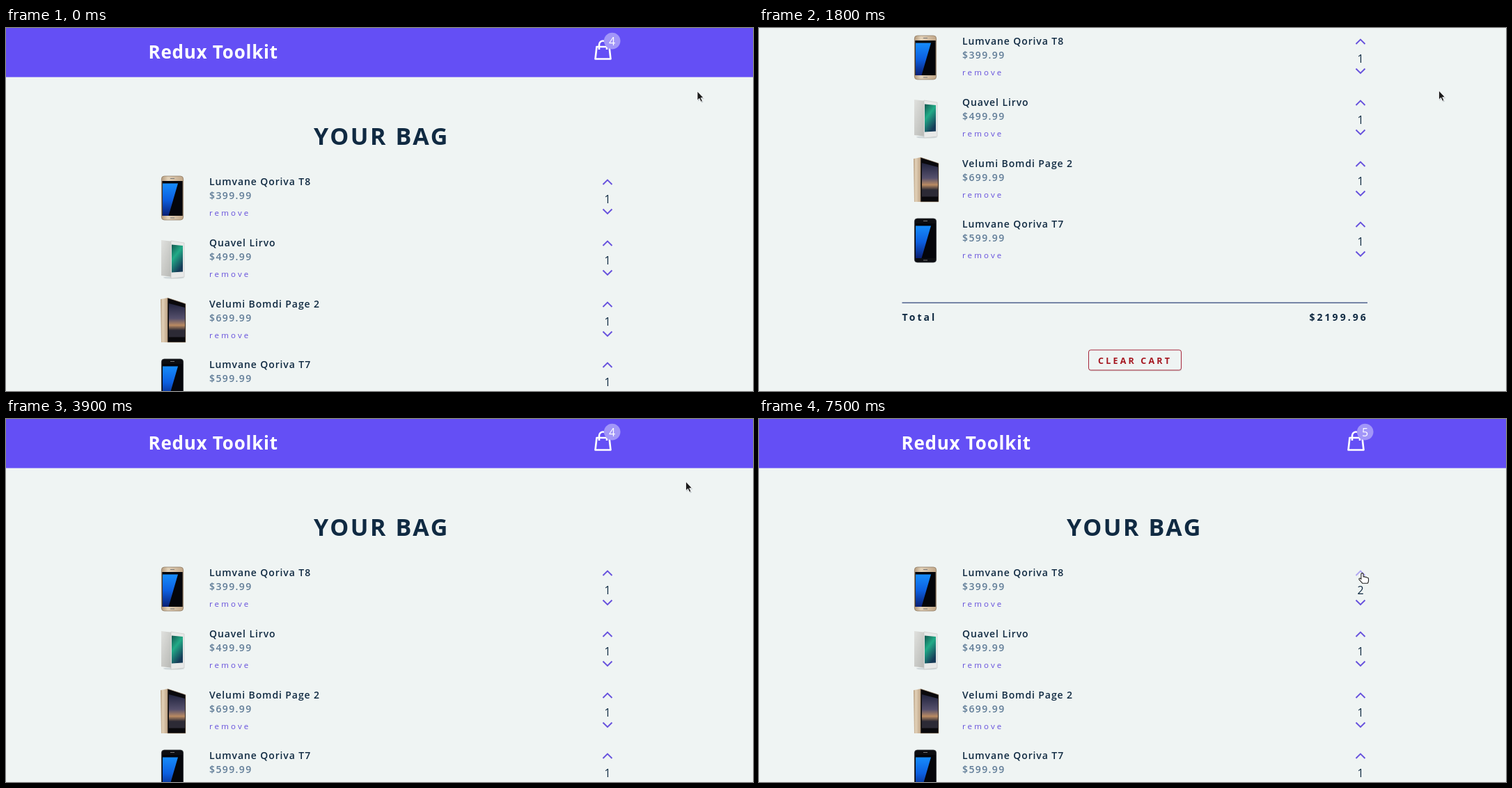
These frames come from a looping animation (1073x522 px, 8000 ms). An HTML page:

```html
<!DOCTYPE html>
<html lang="en">
<head>
<meta charset="utf-8">
<title>Your bag</title>
<style>
  html, body { margin: 0; width: 100%; height: 100%; overflow: hidden; background: #eff4f3; }
  svg { display: block; font-family: "Open Sans", "Noto Sans", sans-serif; fill: #102a42; }
  text { white-space: pre; }
  .brand { font-size: 26px; font-weight: 700; letter-spacing: .75px; fill: #fff; }
  .heading { font-size: 34px; font-weight: 700; letter-spacing: 2.6px; }
  .name { font-size: 14px; font-weight: 600; letter-spacing: .9px; }
  .price { font-size: 14px; font-weight: 600; letter-spacing: 1.4px; fill: #617d98; }
  .remove { font-size: 11.5px; letter-spacing: 3.15px; fill: #6550dc; }
  .qty { font-size: 16px; text-anchor: middle; }
  .badge { fill: #fff; }
  .total { font-size: 14px; font-weight: 700; letter-spacing: 3.05px; }
  .clear { font-size: 12.5px; font-weight: 700; letter-spacing: 3.2px; fill: #a5161f; }
  .chevron { fill: none; stroke: #6650dd; stroke-width: 1.9; }
  .hover { stroke: #b0a6f3; }
</style>
</head>
<body>
<svg width="1073" height="522" viewBox="0 0 1073 522">
  <defs>
    <linearGradient id="blue" x2="0" y2="1">
      <stop stop-color="#168cfb"/><stop offset=".5" stop-color="#0c5fe0"/><stop offset="1" stop-color="#0a1f74"/>
    </linearGradient>
    <linearGradient id="gold">
      <stop stop-color="#b39a7c"/><stop offset=".3" stop-color="#e3d2b9"/><stop offset="1" stop-color="#c0a688"/>
    </linearGradient>
    <linearGradient id="silver" y2="1">
      <stop stop-color="#e0e1de"/><stop offset="1" stop-color="#b4b5b1"/>
    </linearGradient>
    <linearGradient id="teal" x2=".5" y2="1">
      <stop stop-color="#12574f"/><stop offset=".45" stop-color="#22ab87"/><stop offset="1" stop-color="#173b58"/>
    </linearGradient>
    <linearGradient id="dusk" x2="0" y2="1">
      <stop stop-color="#20233d"/><stop offset=".45" stop-color="#56506c"/><stop offset=".65" stop-color="#b98a62"/><stop offset=".8" stop-color="#2c2a35"/>
    </linearGradient>
  </defs>
  <g id="page">
    <rect width="1073" height="70.6" fill="#644ff5"/>
    <text class="brand" x="204.5" y="44">Redux Toolkit</text>
    <path d="M848.5 27H866.5L868.5 44.5H846.5ZM852 31V24a5.5 5.5 0 0 1 11 0V31" fill="none" stroke="#fff" stroke-width="2.6" stroke-linejoin="round"/>
    <circle cx="870.7" cy="18.6" r="11.8" fill="#a296f8"/>
    <text class="qty badge" id="badge" x="870.7" y="24.6"></text>
    <text class="heading" x="442" y="167.7">YOUR BAG</text>
    <g id="items"></g>
    <rect x="205.5" y="596.3" width="668.5" height="1.7" fill="#617399"/>
    <text class="total" x="205.5" y="622.7">Total</text>
    <text class="total" x="790.5" y="622.7">$2199.96</text>
    <rect x="474" y="666.5" width="133" height="29" rx="3" fill="#000" opacity=".1"/>
    <rect x="473.5" y="665" width="133" height="29" rx="3" fill="#eff4f3" stroke="#a5263a"/>
    <text class="clear" x="487" y="684.5">CLEAR CART</text>
  </g>
  <g id="cursor">
    <g id="arrow">
      <path d="M1 1.5V14.5L4 11.7 6.2 16.5 8.5 15.4 6.3 11H10Z" opacity=".2"/>
      <path d="M0 0V13L3 10.3 5.2 15.2 7.4 14.2 5.2 9.5H9Z" fill="#1b1b1b" stroke="#fff" stroke-width=".8"/>
    </g>
    <path id="hand" d="M-1.6 1.2Q0-1 1.6 1.2V5.4Q3.4 4.6 4.2 6Q6 5.2 6.7 6.8Q9 6.3 9 8.4V11Q9 13 7.7 14.7H.3Q-2 12-4.5 9.3Q-5 7.2-3 7.6L-1.6 8.8Z" fill="#fff" stroke="#222" stroke-width="1.1" stroke-linejoin="round"/>
  </g>
</svg>
<script>
const $ = id => document.getElementById(id);

// A phone with a blue slanted panel on a black screen
const slab = (body, edge) => `
  <rect x="223.4" y="213" width="31.2" height="63" rx="4" fill="${body}" stroke="${edge}" stroke-width=".8"/>
  <path d="M224.3 220H253.7V270H224.3Z" fill="#04050a"/>
  <path d="M225 223.5H247L233.5 270H225Z" fill="url(#blue)"/>
  <path d="M236 216.5h6M236 273h6" stroke="#777"/>`;

const pair = `
  <ellipse cx="241" cy="271" rx="15" ry="1.6" opacity=".14"/>
  <path d="M223 217L240 219V270L223 268Z" fill="url(#silver)"/>
  <path d="M237 218L256 221V270L237 272Z" fill="#e8e9e8" stroke="#c4c5c3" stroke-width=".6"/>
  <path d="M238 223.5L254 225V262.5L238 263.5Z" fill="url(#teal)"/>`;

const tilted = `
  <path d="M222 214L232 212V276H223Z" fill="url(#gold)"/>
  <path d="M232 212L258 220.5V276H232Z" fill="#0a090c" stroke="#b59b7c" stroke-width=".6"/>
  <path d="M234 220L257 226V268.5H234Z" fill="url(#dusk)"/>`;

const items = [
  ["Lumvane Qoriva T8", 399.99, slab("url(#gold)", "#8f7a62")],
  ["Quavel Lirvo", 499.99, pair],
  ["Velumi Bomdi Page 2", 699.99, tilted],
  ["Lumvane Qoriva T7", 599.99, slab("#0c0d11", "#34363c")]
];
$("items").innerHTML = items.map(([name, price, phone], i) => `
  <g transform="translate(0 ${Math.round(i * 87.8)})">${phone}
    <text class="name" x="292" y="226">${name}</text>
    <text class="price" x="292" y="246">$${price}</text>
    <text class="remove" x="292" y="270.3">remove</text>
    <path class="chevron" d="M857.5 225L864 218.5 870.5 225"/>
    <text class="qty" x="864" y="251.7">1</text>
    <path class="chevron" d="M857.5 260.5L864 267 870.5 260.5"/>
  </g>`).join("");
const upArrow = document.querySelector(".chevron");
const quantity = document.querySelector("#items .qty");

// Progress from 0 to 1 between two times, and its easings
const ramp = (t, from, to) => Math.min(1, Math.max(0, (t - from) / (to - from)));
const speedUp = (t, from, to, power) => ramp(t, from, to) ** power;
const slowDown = (t, from, to) => 1 - (1 - ramp(t, from, to)) ** 2;
const smooth = (t, from, to) => { const u = ramp(t, from, to); return u * u * (3 - 2 * u); };

const scrollAt = t =>
  173 * speedUp(t, 1000, 1300, 2) + 29 * slowDown(t, 1400, 1800) + 3 * ramp(t, 2100, 2200)
  - 191 * speedUp(t, 3200, 3600, 3.3) - 14 * slowDown(t, 3700, 3900);

const cursorAt = t => [
  993 - 16.5 * slowDown(t, 300, 700) - 113.5 * smooth(t, 4300, 5000)
    + 2 * Math.sin(2 * Math.PI * ramp(t, 6000, 6900))
    + 20 * Math.sin(Math.PI * ramp(t, 6900, 7500)) + 3.5 * ramp(t, 6900, 7500),
  91 - slowDown(t, 300, 900) + 139 * ramp(t, 4300, 4900) - 14 * ramp(t, 4900, 5000)
    + 6.5 * ramp(t, 6900, 7500)
];

const move = (id, x, y) => $(id).setAttribute("transform", `translate(${x} ${y})`);
const start = performance.now();

function draw(now) {
  // The screen refreshes ten times a second
  const t = Math.floor(Math.max(0, now - start) % 8000 / 100) * 100;
  const [x, y] = cursorAt(t);
  const over = x < 877 && y < 228;
  const clicked = t >= 5800;
  move("page", 0, -scrollAt(t));
  move("cursor", x, y);
  $("arrow").style.display = over ? "none" : "";
  $("hand").style.display = over ? "" : "none";
  upArrow.classList.toggle("hover", over);
  quantity.textContent = clicked ? 2 : 1;
  $("badge").textContent = clicked ? 5 : 4;
  requestAnimationFrame(draw);
}
draw(start);
</script>
</body>
</html>
```
